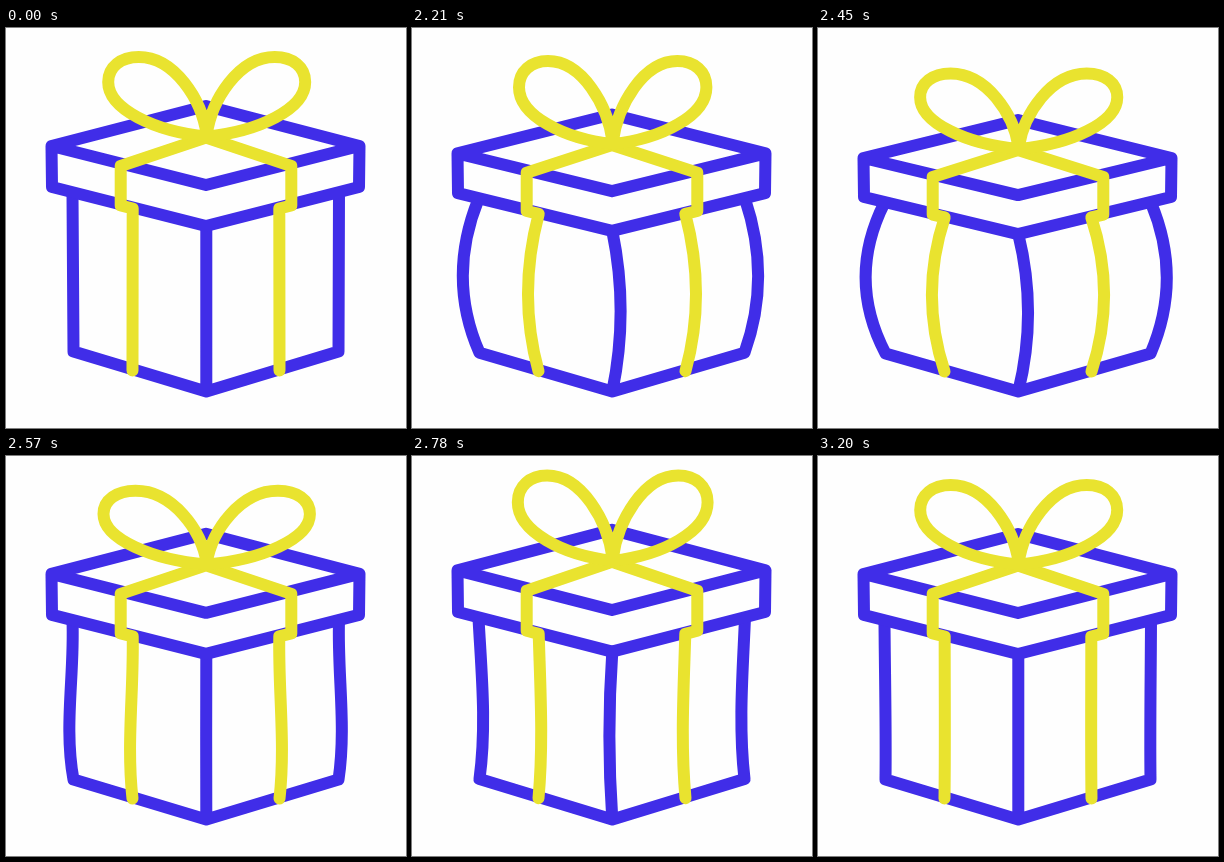
An HTML page for the animation above (3230 ms loop, 400 by 400 pixels).

```html
<!DOCTYPE html>
<html lang="en">
<head>
<meta charset="utf-8">
<title>Gift box</title>
<style>
  html, body { margin: 0; width: 100%; height: 100%; overflow: hidden; background: #fefefe; }
  svg { display: block; width: 100%; height: 100%; }
  path { fill: none; stroke-width: 12; stroke-linecap: round; stroke-linejoin: round; }
  .box { stroke: #402de8; }
  .ribbon { stroke: #e9e32f; }
</style>
</head>
<body>
<svg viewBox="0 0 400 400">
  <path class="box" id="body"/>
  <path class="box" id="lid"/>
  <path class="ribbon" id="ribbon"/>
  <path class="ribbon" id="bow"/>
</svg>
<script>
const LOOP = 3230, PRESS = 2000, RELEASE = 2450, SETTLE = 750, SWING = 240;
const FLOOR = 363, KNOT = 109.5;

const clamp = v => Math.min(1, Math.max(0, v));
const press = t => clamp((t - PRESS) / (RELEASE - PRESS));
const fade = t => 1 - clamp((t - RELEASE) / SETTLE) ** 2;
const phase = t => Math.PI * (t - RELEASE) / SWING;

// Eases from 0 to 1 while pressed, then swings around 0 until it settles;
// rebound scales the swing past 0
const motion = (power, pressLag = 0, springLag = 0, rebound = 1) => t => {
  const s = t - springLag;
  if (s < RELEASE) return Math.sin(press(t - pressLag) * Math.PI / 2) ** power;
  const swing = fade(s) * Math.cos(phase(s));
  return swing < 0 ? swing * rebound : swing;
};

const squash = motion(1.25);
const upper = motion(.4, 30, -10, .5);
const lower = motion(.4, 0, 30, .5);
const front = motion(.4);

// The bow trails the lid: tall while it falls, flat while it rises
const puff = t => t < RELEASE
  ? Math.sin(Math.PI * press(t))
  : -fade(t) * Math.sin(phase(t));

const el = id => document.getElementById(id);
const parts = { body: el('body'), lid: el('lid'), ribbon: el('ribbon'), bow: el('bow') };

function draw(t) {
  const scale = 1 - .049 * squash(t);
  const w = 1 - .049 * puff(t), h = 1 + .076 * puff(t);

  const p = (x, y) => `${x.toFixed(2)} ${(FLOOR + (y - FLOOR) * scale).toFixed(2)} `;
  const move = (x, y) => 'M' + p(x, y);
  const line = (...pts) => pts.map(q => 'L' + p(...q)).join('');
  // Nearly vertical stroke whose two handles are pushed sideways
  const upright = (x0, y0, x1, y1, push0, push1) => {
    const dx = (x1 - x0) / 3, dy = (y1 - y0) / 3;
    return 'C' + p(x0 + dx + push0, y0 + dy) + p(x1 - dx + push1, y1 - dy) + p(x1, y1);
  };

  const up = upper(t), low = lower(t), mid = 13 * front(t);

  parts.body.setAttribute('d',
    move(66.5, 165) + upright(66.5, 165, 67.5, 323.6, -26 * up, -26 * low) +
    line([200.3, 363.5], [332.5, 323.6]) +
    upright(332.5, 323.6, 333, 165, 21.5 * low, 21.5 * up) +
    move(200.3, 198) + upright(200.3, 198, 200.3, 363.5, mid, mid));

  parts.lid.setAttribute('d',
    move(45.5, 118) + line([200, 78], [353.5, 118], [200, 157]) + 'Z' +
    move(45.5, 118) + line([46, 159], [200, 198], [353, 159], [353.5, 118]));

  const band = dir => {
    const x = d => 200 + dir * d;
    return move(200, KNOT) + line([x(85.3), 138], [x(85.3), 177.5], [x(73.3), 180.5]) +
      upright(x(73.3), 180.5, x(73.5), 342.5, dir * 17 * up, dir * 17 * low);
  };
  parts.ribbon.setAttribute('d', band(-1) + band(1));

  const loop = dir => {
    const b = (x, y) => p(200.7 + dir * x * w, KNOT + (y - KNOT) * h);
    return 'M' + b(0, 106.5) +
      'C' + b(5, 72) + b(32, 29) + b(68, 29) +
      'C' + b(86, 29) + b(98.5, 39) + b(98.5, 54) +
      'C' + b(98.5, 81) + b(52, 103.5) + b(0, 108.5);
  };
  parts.bow.setAttribute('d', loop(-1) + loop(1));
}

const start = performance.now();
function tick() {
  draw((performance.now() - start) % LOOP);
  requestAnimationFrame(tick);
}
tick();
</script>
</body>
</html>
```
